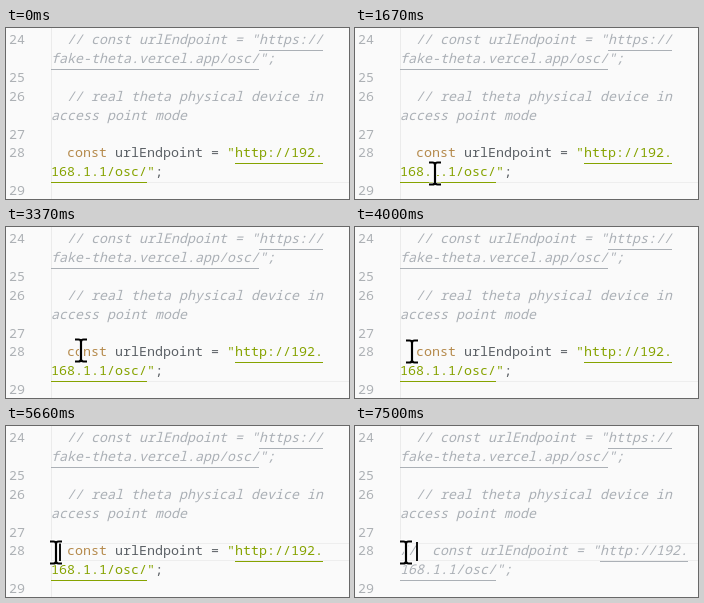
These frames come from a looping animation (343 px wide and 171 px high, 8 s). An HTML page with a canvas:

```html
<!DOCTYPE html>
<html lang="en">
<head>
<meta charset="utf-8">
<title>Editor</title>
<style>
html, body { margin: 0; width: 100%; height: 100%; overflow: hidden; background: #fafafa; }
canvas { display: block; width: 343px; height: 171px; }
</style>
</head>
<body>
<canvas width="343" height="171"></canvas>
<script>
const W = 343, H = 171, LOOP = 8000, CH = 8, LEFT = 45, PITCH = 18.85, BLINK = 530;
const FONT = '13.333px "Noto Sans Mono", "DejaVu Sans Mono", monospace';
const BG = '#fafafa', COMMENT = '#abb0b6', PLAIN = '#5c6166', KEYWORD = '#b58a4c',
      STRING = '#86a300', NUMBER = '#adb1b5', RULE = '#ebebeb';
const CLICK = 4290, CLICK_2 = 6230, SLASH = 7350, SLASH_2 = 7500;
const STATEMENT = '  const urlEndpoint = "http://192.\n168.1.1/osc/";';
const ctx = document.querySelector('canvas').getContext('2d');

// Pointer moves; it rests between them
const MOVES = [
  { from: 620, to: 730, x: 207, y: 132.5 },
  { from: 1180, to: 1670, x: 80, y: 145 },
  { from: 1670, to: 1960, x: 26, y: 159 },
  { from: 2100, to: 2580, x: 75, y: 123.5 },
  { from: 3370, to: 3530, x: 68, y: 124 },
  { from: 3850, to: 4000, x: 57, y: 124.5 },
  { from: 4660, to: 4860, x: 45, y: 141.5 },
  { from: 5340, to: 5660, x: 50, y: 126.5 },
  { from: 5900, to: 5950, x: 51, y: 126.5 }
];

const clamp = v => Math.max(0, Math.min(1, v));
const rowY = (y, n) => Math.round(y + n * PITCH);

function pointer(t) {
  let x = 255, y = 162;
  for (const m of MOVES) {
    const k = clamp((t - m.from) / (m.to - m.from));
    x += (m.x - x) * k;
    y += (m.y - y) * k;
  }
  return [x, y];
}

function rect(x, y, w, h, color) {
  ctx.fillStyle = color;
  ctx.fillRect(x, y, w, h);
}

function text(str, x, y, color, italic) {
  ctx.font = (italic ? 'italic ' : '') + FONT;
  ctx.fillStyle = color;
  ctx.fillText(str, x, y);
}

function tokenColor(token, isComment) {
  if (isComment) return COMMENT;
  if (token === 'const') return KEYWORD;
  return /^(http|")/.test(token) ? STRING : PLAIN;
}

// Draws one logical line from a row on and returns the next free row
function drawLine(line, row) {
  const isComment = line.includes('// ') || line === 'access point mode';
  let col = 0;
  for (const token of line.split(/(const|https?:[^"]*|")/)) {
    const color = tokenColor(token, isComment);
    token.split('\n').forEach((part, i) => {
      if (i) { row++; col = 0; }
      const x = LEFT + col * CH;
      text(part, x, rowY(16.3, row), color, isComment);
      if (token.startsWith('http')) rect(x, rowY(22, row), part.length * CH, 1, color);
      col += part.length;
    });
  }
  return row + 1;
}

function editor(t) {
  const typed = t >= SLASH_2 ? '//' : t >= SLASH ? '/' : '';
  const lines = [
    '  // const urlEndpoint = "https://\nfake-theta.vercel.app/osc/";',
    '',
    '  // real theta physical device in\naccess point mode',
    '',
    typed + STATEMENT,
    ''
  ];
  rect(LEFT, 0, 1, typed ? 116 : H, RULE);
  let row = 0;
  lines.forEach((line, i) => {
    text(String(24 + i), 3, rowY(16.3, row), NUMBER);
    row = drawLine(line, row);
  });
}

function currentLine(t) {
  for (const y of t < CLICK ? [154] : [117, 134]) rect(LEFT, y, W - LEFT, 1, '#eeeeee');
}

function hoverAlpha(t) {
  return t < 1090 || t >= 1560 ? 0 : clamp(0.12 + (t - 1090) / 110);
}

function tooltip(alpha) {
  const x = 119;
  ctx.save();
  ctx.globalAlpha = alpha;
  ctx.shadowColor = 'rgba(0,0,0,.15)';
  ctx.shadowBlur = 8;
  rect(110, 73, 219, 43, '#dcdcdc');
  ctx.shadowBlur = 0;
  rect(111, 74, 217, 41, BG);
  text('const', x, 89, KEYWORD);
  text('urlEndpoint:', x + 6 * CH, 89, PLAIN);
  text('"http://192.168.1.1/osc/"', x, 108, STRING);
  ctx.restore();
}

function caret(t) {
  if (t < CLICK) return;
  const second = t >= CLICK_2;
  const phase = Math.floor((t - (second ? CLICK_2 : CLICK)) / BLINK);
  if (phase % 2) return;
  const col = t >= SLASH_2 ? 2 : second && t < SLASH ? 0 : 1;
  rect(LEFT + col * CH, 116, 2, 19, '#111');
}

function ring(x, y) {
  ctx.beginPath();
  ctx.arc(x - 3, y - 1.5, 17.5, 0, Math.PI * 2);
  ctx.fillStyle = 'rgba(255,225,80,.4)';
  ctx.fill();
}

function beam(x, y) {
  ctx.save();
  ctx.translate(Math.round(x), Math.round(y - .5) + .5);
  ctx.beginPath();
  for (const s of [-1, 1]) {
    ctx.moveTo(-6, 11 * s);
    ctx.lineTo(-2.5, 11 * s);
    ctx.quadraticCurveTo(0, 11 * s, 0, 8.5 * s);
    ctx.quadraticCurveTo(0, 11 * s, 2.5, 11 * s);
    ctx.lineTo(6, 11 * s);
  }
  ctx.moveTo(0, -9);
  ctx.lineTo(0, 9);
  ctx.lineJoin = 'round';
  for (const [w, color] of [[4, '#fff'], [2.2, '#000']]) {
    ctx.lineWidth = w;
    ctx.strokeStyle = color;
    ctx.stroke();
  }
  ctx.restore();
}

function draw(t) {
  const hover = hoverAlpha(t);
  rect(0, 0, W, H, BG);
  currentLine(t);
  if (hover) rect(109, 116, 88, 19, 'rgba(173,214,255,.3)');
  editor(t);
  if (hover) tooltip(hover);
  caret(t);

  if (t < MOVES[0].from) return;
  const [x, y] = pointer(t);
  if ((t >= CLICK && t < 4460) || (t >= CLICK_2 && t < 6330)) ring(x, y);
  beam(x, y);
}

const start = performance.now();
function tick() {
  draw((performance.now() - start) % LOOP);
  requestAnimationFrame(tick);
}
tick();
</script>
</body>
</html>
```
